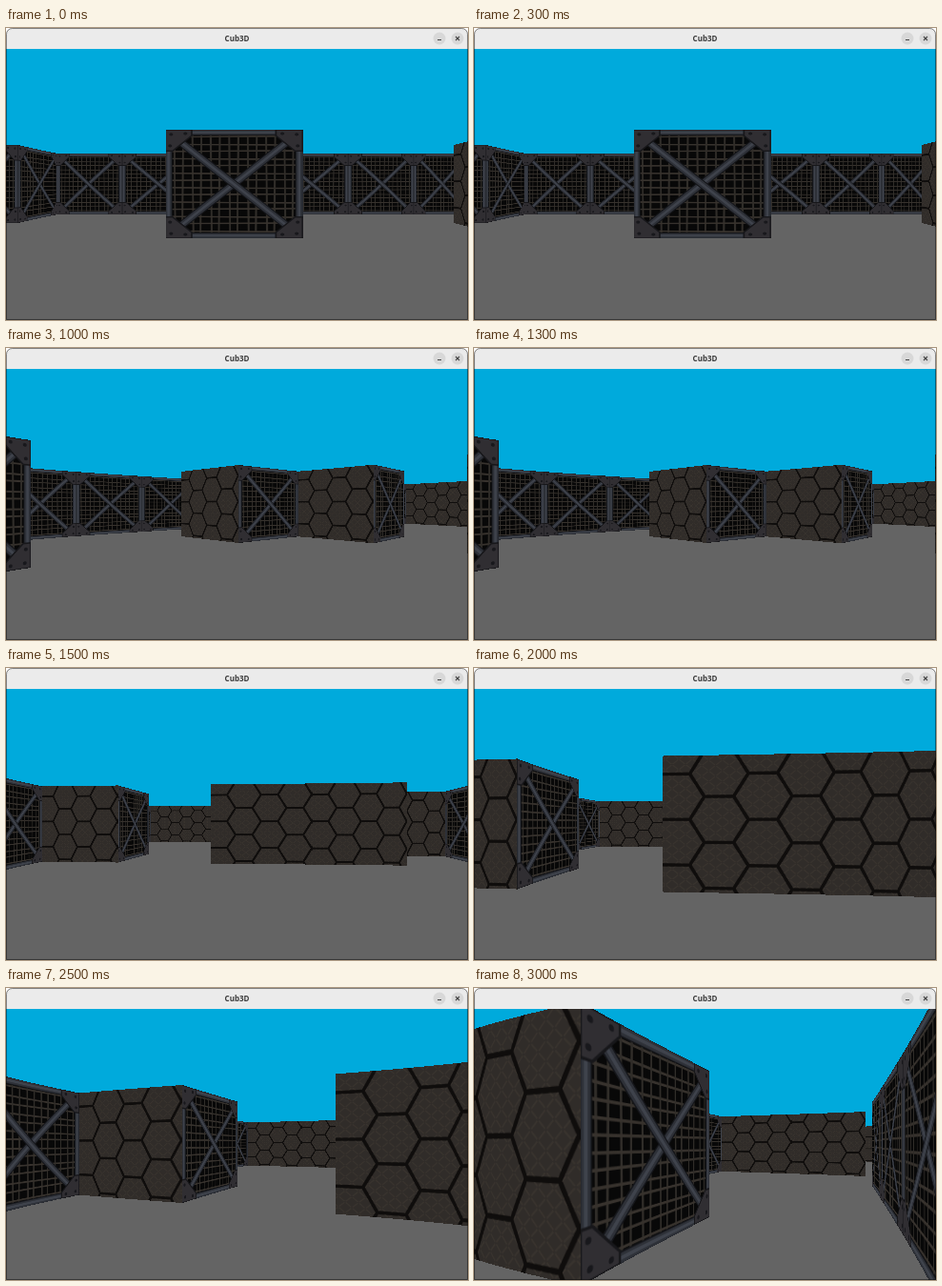
These frames come from a looping animation (485x307 px, 3500 ms). An HTML page with a canvas:

```html
<!DOCTYPE html>
<html>
<head>
<meta charset="utf-8">
<style>
  html, body { margin: 0; width: 485px; height: 307px; overflow: hidden; background: #fff; }
  canvas { display: block; }
</style>
</head>
<body>
<canvas id="stage" width="485" height="307"></canvas>
<script>
const W = 485, H = 307, BAR = 22, HORIZON = 164;
const FOV = 1.3, WALL = 292, TEX = 256, STEP = 500;
const g = document.getElementById('stage').getContext('2d');

const map = [
  '################',
  '#..............#',
  '...#..#####....#',
  '.......#...#...#',
  '...........#...#',
  '.......###.....#',
  '.......#.......#',
  '........#......#',
  '################'
];

// Camera stops: x, y, heading (0 looks up the map, clockwise)
const stops = [
  [3.52, 5.56, 0],
  [3.52, 5.56, 0.238],
  [3.52, 5.56, 0.765],
  [3.52, 5.56, 1.484],
  [4.987, 5.425, 1.483],
  [4.95, 5.215, 1.19],
  [6.232, 4.7, 1.181]
];

function texture(paint) {
  const c = document.createElement('canvas');
  c.width = c.height = TEX;
  paint(c.getContext('2d'));
  return c;
}

function line(t, x1, y1, x2, y2, width, color) {
  t.strokeStyle = color;
  t.lineWidth = width;
  t.beginPath();
  t.moveTo(x1, y1);
  t.lineTo(x2, y2);
  t.stroke();
}

function disc(t, x, y, r, color) {
  t.fillStyle = color;
  t.beginPath();
  t.arc(x, y, r, 0, 7);
  t.fill();
}

// Steel bar: dark rim, body, highlight
function bar(t, x1, y1, x2, y2, width) {
  line(t, x1, y1, x2, y2, width, '#15161a');
  line(t, x1, y1, x2, y2, width * 0.75, '#2e3138');
  line(t, x1, y1, x2, y2, width * 0.3, '#3f434c');
}

const mesh = texture(t => {
  t.fillStyle = '#080808';
  t.fillRect(0, 0, TEX, TEX);
  for (let i = 1; i < 15; i++) {
    const p = i * TEX / 15, bend = i % 2 ? 2 : -2;
    line(t, p, 0, p + bend, TEX, 3.5, '#302d29');
    line(t, 0, p, TEX, p - bend, 3.5, '#37322d');
  }
  bar(t, 0, TEX, TEX, 0, 17);
  bar(t, 0, 0, TEX, TEX, 17);
  for (const e of [6, TEX - 6]) {
    bar(t, e, 0, e, TEX, 15);
    bar(t, 0, e, TEX, e, 15);
  }
  for (const [x, y] of [[0, 0], [1, 0], [1, 1], [0, 1]]) {
    t.save();
    t.translate(x * TEX, y * TEX);
    t.scale(x ? -1 : 1, y ? -1 : 1);
    t.beginPath();
    for (const p of [[0, 0], [50, 0], [50, 14], [14, 50], [0, 50]]) t.lineTo(...p);
    t.closePath();
    t.fillStyle = '#302e32';
    t.fill();
    t.strokeStyle = '#17171a';
    t.lineWidth = 3;
    t.stroke();
    for (const [a, b] of [[11, 11], [38, 9], [9, 38]]) disc(t, a, b, 3.5, '#18181c');
    t.restore();
  }
});

const hex = texture(t => {
  const pitch = TEX / 4, tall = TEX / 3, r = pitch / 1.5;
  t.fillStyle = '#0f0d0c';
  t.fillRect(0, 0, TEX, TEX);
  for (let c = 0; c <= 5; c++) for (let row = -1; row < 4; row++) {
    t.save();
    t.translate((c - 0.68) * pitch, (row + 0.4 + c % 2 / 2) * tall);
    t.beginPath();
    for (let k = 0; k < 6; k++) {
      const a = k * Math.PI / 3;
      t.lineTo((r - 3) * Math.cos(a), (tall / 2 - 3) * Math.sin(a) / Math.sin(Math.PI / 3));
    }
    t.closePath();
    t.fillStyle = '#302c29';
    t.fill();
    t.clip();
    for (let i = -4; i < 5; i++) for (let j = -4; j < 5; j++) {
      const x = i * 10, y = j * 10, d = (i + j) % 2 ? 4 : -4;
      line(t, x - 4, y - d, x + 4, y + d, 2, '#39342f');
    }
    t.strokeStyle = 'rgba(15,13,12,.5)';
    t.lineWidth = 6;
    t.stroke();
    t.restore();
  }
});

// Steps through the grid until a wall; returns distance, position along it and texture
function cast(px, py, angle) {
  const dx = Math.sin(angle), dy = -Math.cos(angle);
  const sx = Math.sign(dx), sy = Math.sign(dy);
  let cx = Math.floor(px), cy = Math.floor(py);
  for (;;) {
    const tx = dx ? (cx + (sx > 0) - px) / dx : Infinity;
    const ty = dy ? (cy + (sy > 0) - py) / dy : Infinity;
    const dist = Math.min(tx, ty), sideways = tx < ty;
    if (sideways) cx += sx; else cy += sy;
    if (!map[cy] || map[cy][cx] !== '.') {
      const along = sideways ? py + dist * dy : px + dist * dx;
      return { dist, u: along - Math.floor(along), tex: sideways && sx > 0 ? hex : mesh };
    }
  }
}

function drawView([px, py, heading]) {
  g.fillStyle = '#00aadc';
  g.fillRect(0, BAR, W, HORIZON - BAR);
  g.fillStyle = '#646464';
  g.fillRect(0, HORIZON, W, H - HORIZON);
  for (let x = 0; x < W; x++) {
    const a = ((x + 0.5) / W - 0.5) * FOV;
    const { dist, u, tex } = cast(px, py, heading + a);
    const h = WALL / (dist * Math.cos(a));
    const sw = Math.max(1, 200 / h);
    g.drawImage(tex, Math.min(u * TEX, TEX - sw), 0, sw, TEX, x, HORIZON - h / 2, 1, h);
  }
}

function drawWindow() {
  g.fillStyle = '#fff';
  g.fillRect(0, 0, W, BAR);
  g.fillStyle = '#ebebeb';
  g.beginPath();
  g.roundRect(0, 0, W, BAR, [6, 6, 0, 0]);
  g.fill();
  g.fillStyle = '#3a3a3a';
  g.font = 'bold 8px "Open Sans", sans-serif';
  g.textAlign = 'center';
  g.fillText('Cub3D', 242.5, 14);
  for (const x of [455, 474]) disc(g, x, 11, 6.5, '#d8d8d8');
  line(g, 453, 12.5, 457, 12.5, 1, '#444');
  line(g, 472, 9, 476, 13, 1.1, '#444');
  line(g, 476, 9, 472, 13, 1.1, '#444');
  g.strokeStyle = 'rgba(0,0,0,.45)';
  g.lineWidth = 1;
  g.beginPath();
  g.roundRect(0.5, 0.5, W - 1, H - 1, [6, 6, 0, 0]);
  g.stroke();
}

let shown = -1;
function tick() {
  const i = Math.floor(performance.now() / STEP) % stops.length;
  if (i !== shown) {
    shown = i;
    drawView(stops[i]);
    drawWindow();
  }
  requestAnimationFrame(tick);
}
tick();
</script>
</body>
</html>
```
